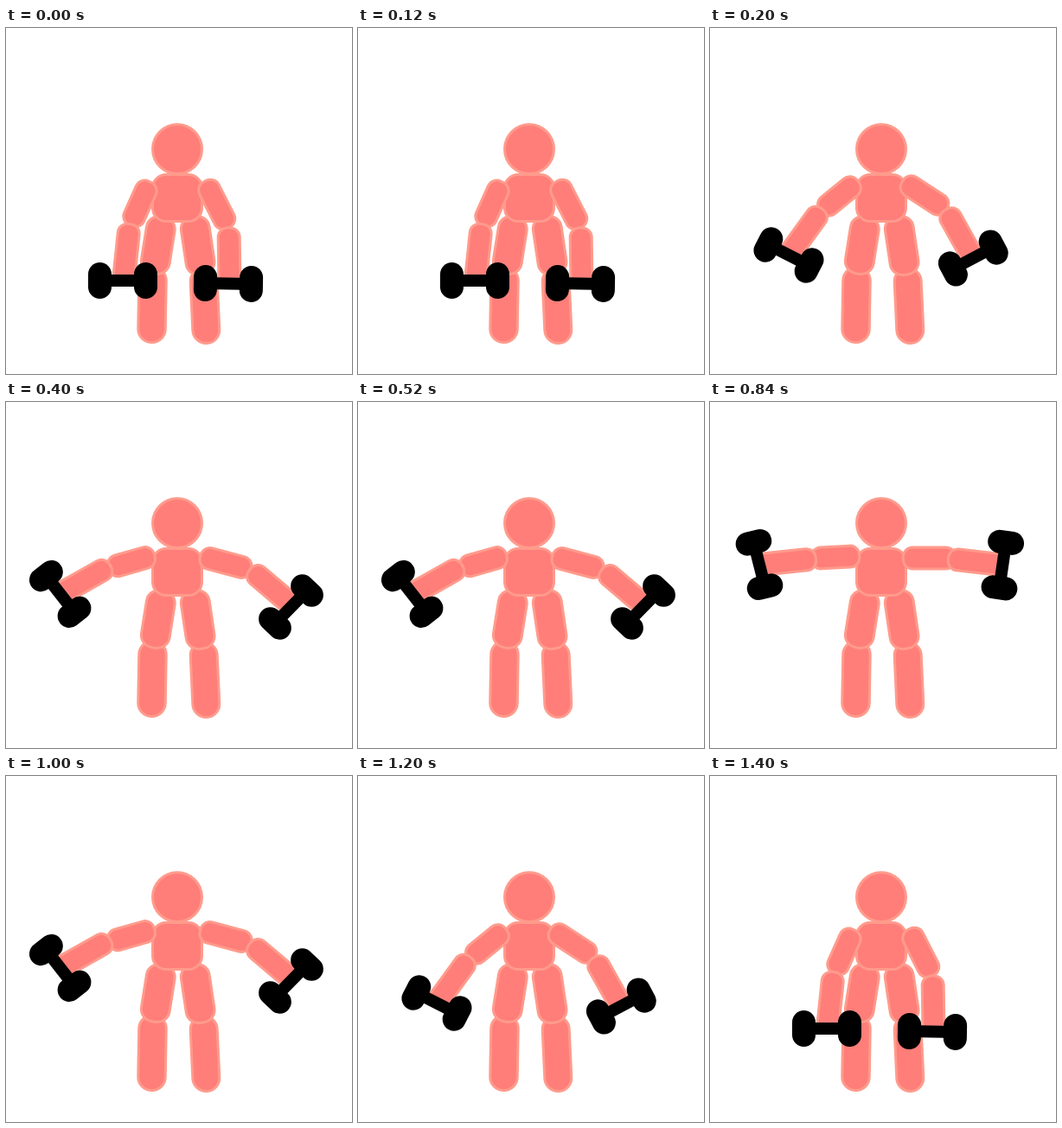
Write an HTML page with a canvas that moves like this. It is 400 px wide and 400 px high and loops after 1.6 s.

```html
<!DOCTYPE html>
<html lang="en">
<head>
<meta charset="utf-8">
<title>Dumbbell raise</title>
<style>
  html, body { margin: 0; width: 100%; height: 100%; overflow: hidden; background: #fff; }
  canvas { display: block; width: 400px; height: 400px; }
</style>
</head>
<body>
<canvas id="stage" width="400" height="400"></canvas>
<script>
const ctx = document.getElementById('stage').getContext('2d');
const SKIN = '#ff7e79', EDGE = '#ff9b8c', LINE = 3, ARM = 28;
const STEP = 200, LOOP = 1600;
const ORDER = [0, 1, 2, 3, 3, 2, 1, 0];

// upper: centre x, y and angle; fore: elbow to hand; bell: centre and angle
const LEFT = {
  length: 58.5,
  poses: [
    { upper: [155, 203, 24], fore: [143, 225, 136, 292], bell: [135, 292, 0] },
    { upper: [149.5, 194.5, 51], fore: [130.5, 208, 91, 262.5], bell: [91, 262.5, 27] },
    { upper: [145, 184.7, 74], fore: [122, 188.5, 62.7, 222], bell: [62.7, 222, 52] },
    { upper: [145, 179.5, 87], fore: [124, 181, 57, 188], bell: [57, 188, 75.7] }
  ]
};
const RIGHT = {
  length: 63.5,
  poses: [
    { upper: [243.7, 204, -27], fore: [257.5, 229.5, 258.5, 295.5], bell: [257, 295.5, 1] },
    { upper: [248, 193.5, -56.7], fore: [272, 208.5, 303.5, 265], bell: [304.3, 266, -28] },
    { upper: [254, 186, -75], fore: [281, 192.5, 331, 235], bell: [329.5, 237, -45.7] },
    { upper: [253.5, 180.5, -90], fore: [274, 181, 338.3, 188.3], bell: [338.3, 188.6, -81.7] }
  ]
};

function at(x, y, angle, draw) {
  ctx.save();
  ctx.translate(x, y);
  ctx.rotate(angle);
  draw();
  ctx.restore();
}

const rad = deg => deg * Math.PI / 180;

function paint() {
  ctx.fillStyle = SKIN;
  ctx.strokeStyle = EDGE;
  ctx.lineWidth = LINE;
  ctx.fill();
  ctx.stroke();
}

// Rounded block measured to the outside of its outline
function block(x, y, deg, w, h, r) {
  at(x, y, rad(deg), () => {
    ctx.beginPath();
    ctx.roundRect((LINE - w) / 2, (LINE - h) / 2, w - LINE, h - LINE, r - LINE / 2);
    paint();
  });
}

function forearm(x1, y1, x2, y2) {
  const dx = x2 - x1, dy = y2 - y1, w = ARM - LINE, r = 11;
  at(x1, y1, Math.atan2(-dx, dy), () => {
    ctx.beginPath();
    ctx.roundRect(-w / 2, LINE / 2, w, Math.hypot(dx, dy) - LINE, [r, r, 0, 0]);
    paint();
  });
}

function dumbbell(x, y, deg) {
  at(x, y, rad(deg), () => {
    ctx.fillStyle = '#000';
    ctx.fillRect(-26.5, -7, 53, 14);
    for (const side of [-1, 1]) {
      ctx.beginPath();
      ctx.roundRect(side * 26.5 - 13.5, -21, 27, 42, 13.5);
      ctx.fill();
    }
  });
}

function body() {
  block(169, 320, 1, 34.5, 90, 17);
  block(230, 321, -2.7, 34, 90, 17);
  block(175.8, 251, 9, 36, 70, 16);
  block(221.7, 251.5, -8.5, 36, 71, 16);
  block(198, 196.5, 0, 60, 57, 17);
  ctx.beginPath();
  ctx.arc(198, 140, 28.5, 0, Math.PI * 2);
  paint();
}

function arm(side, i) {
  const { upper, fore, bell } = side.poses[i];
  block(...upper, ARM, side.length, 12.5);
  forearm(...fore);
  dumbbell(...bell);
}

function render(time) {
  const pose = ORDER[Math.floor(time % LOOP / STEP)];
  ctx.fillStyle = '#fff';
  ctx.fillRect(0, 0, 400, 400);
  body();
  arm(LEFT, pose);
  arm(RIGHT, pose);
}

const start = performance.now();
function tick() {
  render(performance.now() - start);
  requestAnimationFrame(tick);
}
tick();
</script>
</body>
</html>
```
